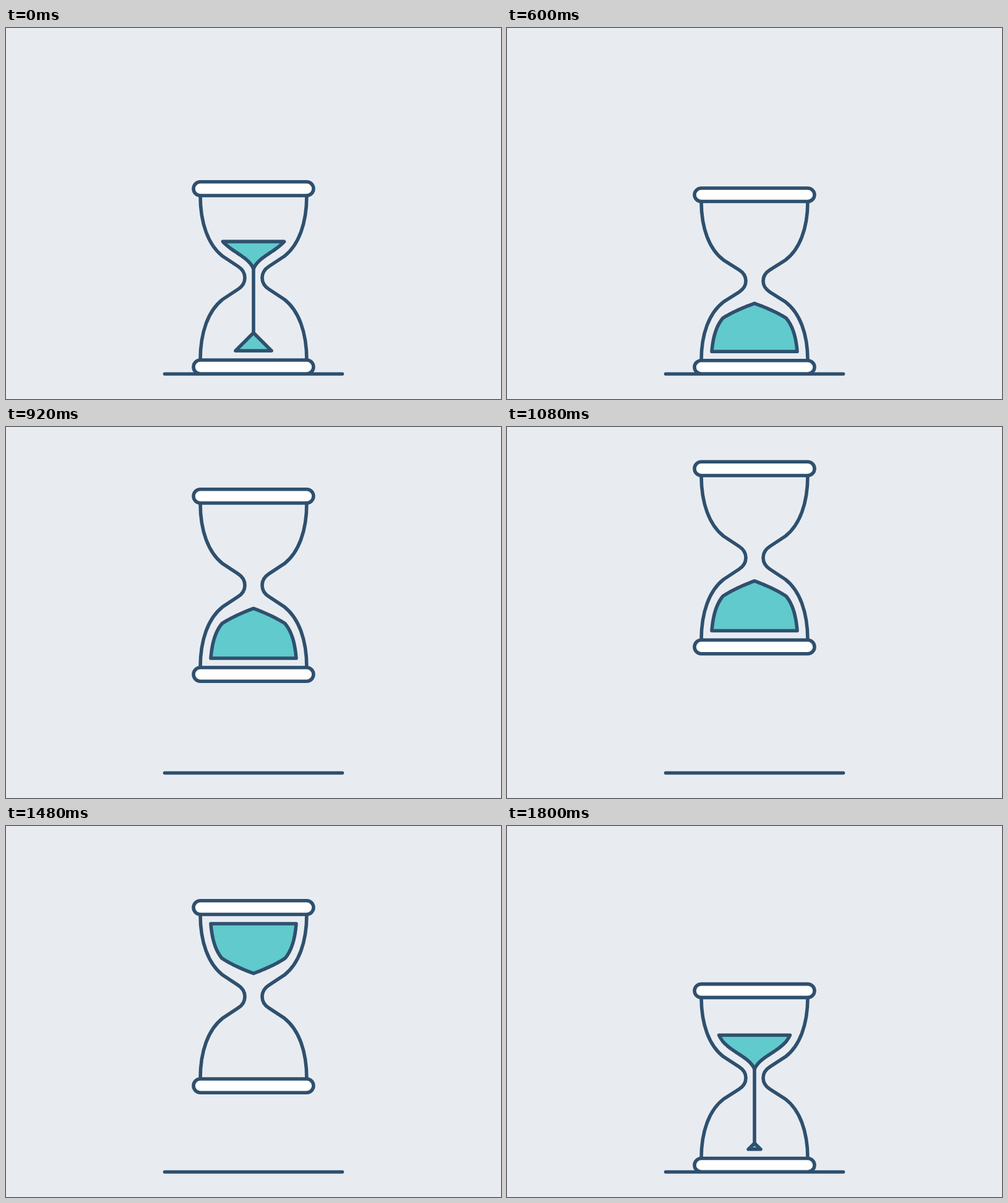
These frames come from a looping animation (800x600 px, 1840 ms). An HTML page with a canvas:

```html
<!DOCTYPE html>
<html lang="en">
<head>
<meta charset="utf-8">
<title>Hourglass</title>
<style>
html, body { margin: 0; width: 100%; height: 100%; overflow: hidden; background: #e8ecf1; }
canvas { display: block; }
</style>
</head>
<body>
<canvas id="stage" width="800" height="600"></canvas>
<script>
const ctx = document.getElementById('stage').getContext('2d');
const LOOP = 1840, STEP = 40;
const INK = '#2f506e', SAND = '#61cacd', BG = '#e8ecf1';
const FOOT = 155.25, REST = 404, PEAK = 211.5;

const clamp = v => Math.min(1, Math.max(0, v));
const span = (t, a, b) => clamp((t - a) / (b - a));
const mix = (a, b, k) => a + (b - a) * k;
const mixPoints = (a, b, k) => a.map((p, i) => p.map((v, j) => mix(v, b[i][j], k)));
const inOut = u => u < .5 ? 2 * u * u : 1 - 2 * (1 - u) ** 2;
const easeOut = (u, p) => 1 - (1 - u) ** p;

// Right-hand outlines, each two cubic Beziers; y is measured from the neck.
const HEAP = [[69, 118], [67, 92], [61, 74], [51, 62], [36, 52], [15, 43], [0, 37.5]];
const FUNNEL = [[69, 118], [67, 92], [61, 74], [51, 60], [33, 40], [8, 34], [0, 14.5]];

let pose;

function paint(build, fill, turn = pose.rot) {
  ctx.save();
  ctx.translate(400, pose.y + FOOT);
  ctx.scale(1, pose.squash);
  ctx.translate(0, -FOOT);
  ctx.rotate(turn);
  ctx.beginPath();
  build();
  ctx.restore();
  if (fill) { ctx.fillStyle = fill; ctx.fill(); }
  ctx.stroke();
}

function sample(p) {
  const out = [];
  for (let i = 0; i <= 48; i++) {
    const b = i < 24 ? 0 : 3, s = (i - b * 8) / 24, r = 1 - s;
    out.push([0, 1].map(j => r ** 3 * p[b][j] + 3 * r * r * s * p[b + 1][j]
      + 3 * r * s * s * p[b + 2][j] + s ** 3 * p[b + 3][j]));
  }
  return out;
}

// Mirrored sand body; dir -1 puts it above the neck, cut at the given level.
function sand(points, dir, level = 118) {
  const wall = sample(points);
  const first = wall.findIndex(p => p[1] <= level);
  const side = wall.slice(first);
  if (first > 0) {
    const [a, b] = [wall[first - 1], wall[first]];
    side.unshift([mix(a[0], b[0], (a[1] - level) / (a[1] - b[1])), level]);
  }
  paint(() => {
    side.forEach(([x, y]) => ctx.lineTo(-x, dir * y));
    side.reverse().forEach(([x, y]) => ctx.lineTo(x, dir * y));
    ctx.closePath();
  }, SAND);
}

function line(x1, y1, x2, y2) {
  ctx.moveTo(x1, y1);
  ctx.lineTo(x2, y2);
}

function glass() {
  for (const s of [-1, 1]) paint(() => {
    ctx.moveTo(s * 86, -133);
    ctx.bezierCurveTo(s * 86, -88, s * 73, -53, s * 50, -35);
    ctx.lineTo(s * 25, -18.5);
    ctx.bezierCurveTo(s * 18, -14, s * 14, -7, s * 14, 0);
    ctx.bezierCurveTo(s * 14, 7, s * 18, 14, s * 25, 18.5);
    ctx.lineTo(s * 50, 35);
    ctx.bezierCurveTo(s * 73, 53, s * 86, 88, s * 86, 133);
  });
}

function flow(t) {
  const level = mix(118, 14.5, easeOut(span(t, 1660, 2040), 1.33));
  if (t < 2040) sand(mixPoints(HEAP, FUNNEL, span(t, 1640, 1720)), -1, level);

  const h = 80.5 * easeOut(span(t, 1782, 2200), 3);
  const k = clamp((h - 30) / 50.5);
  const head = mix(-14.5, 118 - h, span(t, 1710, 1782) ** 2);
  const tail = mix(-14.5, 118 - h, span(t, 2030, 2110) ** 2);
  if (head > tail) paint(() => line(0, tail, 0, head));

  if (h > 0) {
    const half = h - 11.5 * k;
    const cone = HEAP.map((_, i) => [half * (1 - i / 6), 118 - h * i / 6]);
    sand(mixPoints(cone, HEAP, k), 1);
  }
}

function swoosh(t, rot) {
  const u = span(t, 1170, 1300);
  if (u <= 0 || u >= 1) return;
  const rad = Math.PI / 180;
  for (const [r, lag, len] of [[145, 135, 79], [98, 150, 59]])
    for (const side of [0, 180]) {
      const head = rot - lag + side;
      ctx.beginPath();
      ctx.arc(400, PEAK, r, (head - len * Math.sin(u * Math.PI)) * rad, head * rad);
      ctx.stroke();
    }
}

function draw(now) {
  let t = Math.floor(now % LOOP / STEP) * STEP;
  if (t < 560) t += LOOP;

  const lift = t < 1280 ? easeOut(span(t, 680, 1080), 1.6)
    : 1 - span(t, 1280, 1660) ** 1.705;
  const press = t < 1000 ? span(t, 560, 640) - span(t, 640, 680)
    : span(t, 1650, 1710) - span(t, 1720, 1840);
  const turn = 180 * inOut(span(t, 1084, 1276));
  const landed = t >= 1640;
  pose = {
    y: mix(REST, PEAK, lift),
    squash: 1 - .066 * press,
    rot: landed ? 0 : turn * Math.PI / 180
  };

  ctx.fillStyle = BG;
  ctx.fillRect(0, 0, 800, 600);
  ctx.strokeStyle = INK;
  ctx.lineWidth = 5.6;
  ctx.lineCap = ctx.lineJoin = 'round';

  ctx.beginPath();
  line(256.5, 559.5, 543.5, 559.5);
  ctx.stroke();

  swoosh(t, turn);
  glass();
  if (landed) flow(t);
  else sand(HEAP, 1);
  for (const y of [-FOOT, 133])
    paint(() => ctx.roundRect(-97, y, 194, 22.25, 11.1), '#fff');
}

const start = performance.now();
function tick() {
  draw(performance.now() - start);
  requestAnimationFrame(tick);
}
tick();
</script>
</body>
</html>
```
